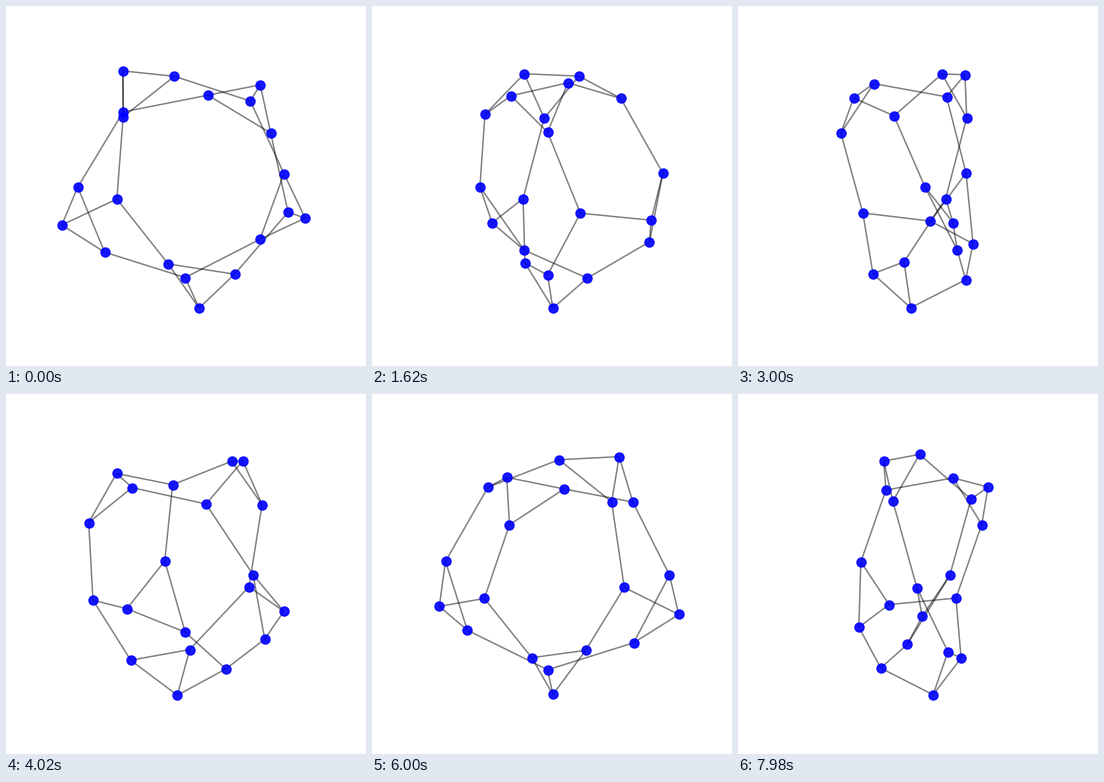
Recreate the animation shown at these times as a matplotlib script. Size 360x360 px, loop 8000 ms.

```python
import numpy as np
import matplotlib.pyplot as plt
from matplotlib.animation import FuncAnimation
from matplotlib.collections import LineCollection

SIZE, DPI = 360, 72
INTERVAL, FRAMES = 20, 400          # 8 s loop
CENTER = np.array([0.5135 * SIZE, 0.4865 * SIZE])
VIEW_DIST = SIZE / 0.185            # camera distance in pixels

# right, toward the viewer, down; listed along a closed tour of the graph
NODES = np.array([
    (-68.2, -8.0, -110.7), (-68.9, -33.8, -65.4), (-16.8, -40.0, -107.0),
    (60.5, -33.9, -81.5), (68.1, 36.3, -94.5), (16.5, 67.2, -83.0),
    (77.1, 66.9, -46.4), (95.1, 41.5, 30.4), (115.9, -27.7, 37.5),
    (95.9, -58.4, -7.7), (71.3, -61.4, 60.0), (-5.8, -42.4, 98.5),
    (8.2, 10.9, 126.2), (42.8, 42.2, 91.0), (-22.4, 23.3, 81.8),
    (-74.4, -10.9, 18.0), (-129.7, -9.7, 44.1), (-87.2, -21.0, 71.8),
    (-112.1, 17.6, 5.9), (-66.2, 42.1, -67.7),
])
CHORDS = [(0, 2), (1, 15), (3, 9), (4, 6), (5, 19),
          (7, 13), (8, 10), (11, 17), (12, 14), (16, 18)]
COUNT = len(NODES)
EDGES = np.array([(i, (i + 1) % COUNT) for i in range(COUNT)] + CHORDS)


def project(degrees):
    """Turn the graph about its vertical axis; return screen points and depth."""
    t = np.radians(degrees)
    a, b, down = NODES.T
    right = a * np.cos(t) - b * np.sin(t)
    depth = a * np.sin(t) + b * np.cos(t)
    scale = 1 / (1 - depth / VIEW_DIST)
    return CENTER + np.column_stack([right * scale, down * scale]), depth


fig = plt.figure(figsize=(SIZE / DPI, SIZE / DPI), dpi=DPI, facecolor="white")
ax = fig.add_axes([0, 0, 1, 1])
ax.set_xlim(0, SIZE)
ax.set_ylim(SIZE, 0)
ax.axis("off")

lines = LineCollection([], colors="black", alpha=0.5, linewidths=1.5, zorder=1)
ax.add_collection(lines)
dots = ax.scatter(NODES[:, 0], NODES[:, 2], s=80, color="blue", alpha=0.9,
                  linewidths=1.5, zorder=2)


def update(frame):
    step = (2 * frame + 1) // 3     # one degree every 30 ms
    points, depth = project(step)
    lines.set_segments(points[EDGES])
    dots.set_offsets(points[np.argsort(depth)])
    return lines, dots


def init():
    return update(0)


anim = FuncAnimation(fig, update, frames=FRAMES, init_func=init,
                     interval=INTERVAL, repeat=True, repeat_delay=0)
plt.show()
```
